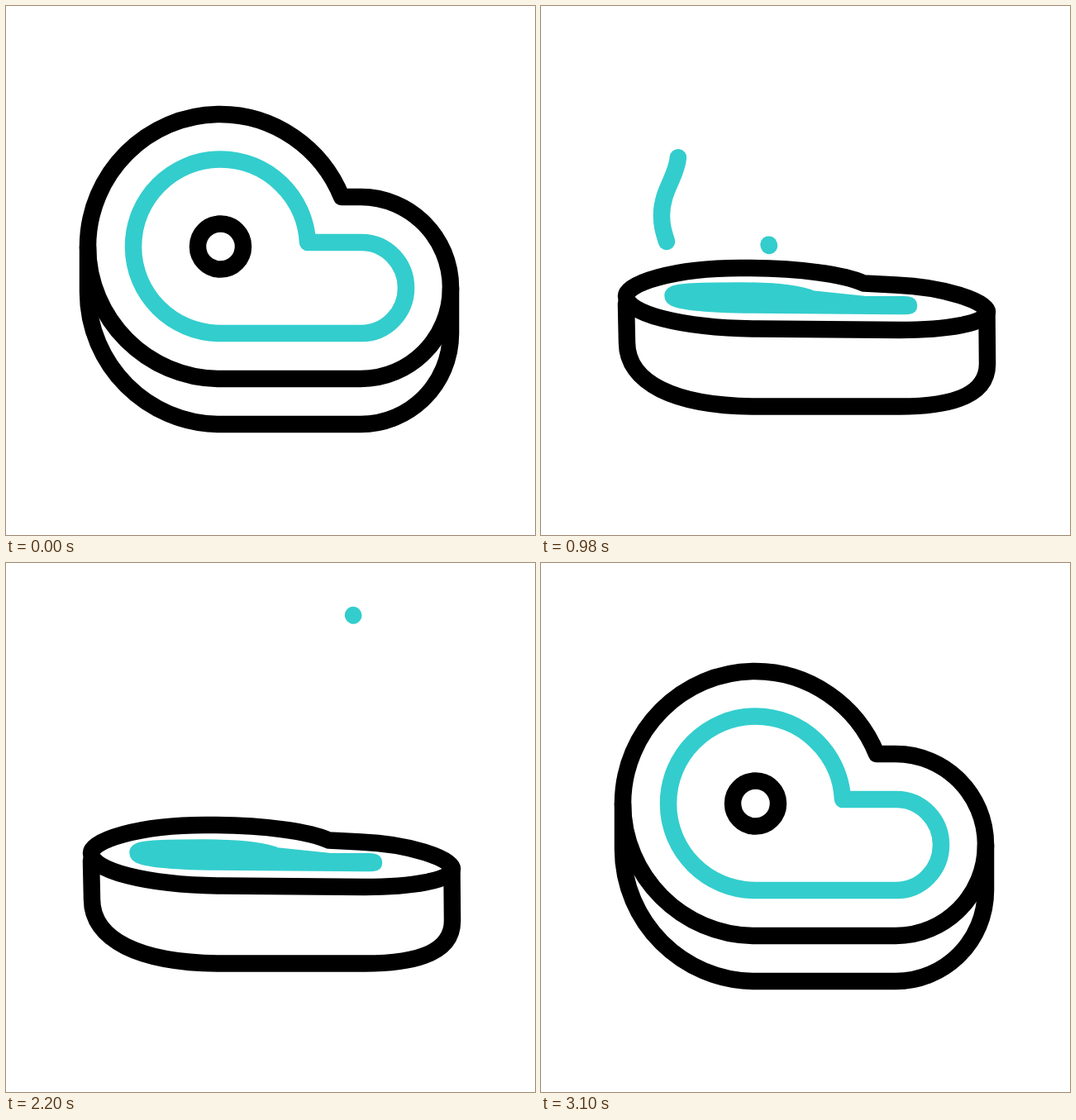
An HTML page that plays this animation: 640 px wide and 640 px high, repeating every 3580 ms.

```html
<!DOCTYPE html>
<html lang="en">
<head>
<meta charset="utf-8">
<title>Steak</title>
<style>
  html, body { margin: 0; width: 100%; height: 100%; overflow: hidden; background: #fff; }
  svg { display: block; width: 100%; height: 100%; }
  path { fill: none; stroke: #000; stroke-width: 20.5; stroke-linecap: round; stroke-linejoin: round; }
  .teal { stroke: #33cdcd; }
</style>
</head>
<body>
<svg viewBox="0 0 640 640">
  <path id="side"/>
  <path id="top"/>
  <path id="bone"/>
  <path id="fat" class="teal"/>
</svg>
<script>
const LOOP = 3580;
const svg = document.querySelector('svg');

// Each shape: standing pose, then lying pose with the same commands
const shapes = {
  side: [
    'M99 291 L99 346 C99 434 171 506 259 506 L429 506 C489 506 538 457 538 396 L538 341',
    'M103 360 L104 407 C104 455 160 484.5 262 484.5 L434 484.5 C505 484.5 540 468 540 433 L539.5 375'],
  top: [
    'M99 291 C99 203 171 131 259 131 C325 131 382 172 406 231 L429 231 C489 231 538 280 538 341 C538 402 489 451 429 451 L259 451 C171 451 99 379 99 291 Z',
    'M103 351 C103 336 160 317 241 317 C315 317 368 325 390.5 335.5 L429 337.5 C490 340 540 358 540 370 C540 384 490 392 434 392 L262 390.5 C170 390 103 372 103 351 Z'],
  bone: [
    'M232 291 A27.5 27.5 0 1 1 287 291 A27.5 27.5 0 1 1 232 291 Z',
    'M234 354 A27 0.4 0 1 1 288 354 A27 0.4 0 1 1 234 354 Z'],
  fat: [
    'M154 291 C154 233 201 185.5 259.5 185.5 C316 185.5 362 230 365 286 L430 286 C460 286 484 311 484 341 C484 371 460 396 430 396 L259.5 396 C201 396 154 349 154 291 Z',
    'M159.5 350.5 C159.5 346 185 344.5 240 344.5 C285 344.5 313 348 327.5 354.5 L390 361 C415 362 445 360 445 362.5 C445 363 438 363 430 363 L245 361.5 C185 360 159.5 356 159.5 350.5 Z']
};

const wisp = 'M152 285 C148 272 146 266 146 253 C146 222 166 205 166 180 C166 160 154 150 154 134 C154 120 167 94 167 68 C167 58 165 49 161 41';
const wisps = [[0, 0], [124, 5], [259, 22]].map(([x, y]) => {
  const p = document.createElementNS(svg.namespaceURI, 'path');
  p.setAttribute('class', 'teal');
  p.setAttribute('d', wisp);
  p.setAttribute('pathLength', 1);
  p.setAttribute('transform', `translate(${x} ${y})`);
  return svg.appendChild(p);
});

const progress = (t, from, to) => Math.min(1, Math.max(0, (t - from) / (to - from)));
const easeInOut = u => (1 - Math.cos(Math.PI * u)) / 2;
const easeOut = u => 1 - (1 - u) ** 2;

function morph([a, b], k) {
  const ends = b.match(/[\d.]+/g);
  let i = 0;
  // The unary plus keeps arc flags as a bare 0 or 1
  return a.replace(/[\d.]+/g, n => +(+n + (ends[i++] - n) * k).toFixed(2));
}

function draw(t) {
  const tilt = easeOut(progress(t, 290, 985)) - easeInOut(progress(t, 2215, 3095));
  for (const id in shapes)
    document.getElementById(id).setAttribute('d', morph(shapes[id], tilt));

  wisps.forEach((p, i) => {
    const local = t - 250 * i;
    const head = easeInOut(progress(local, 703, 1323));
    const tail = easeInOut(progress(local, 1120, 1720));
    p.style.display = head > 0 && tail < 1 ? '' : 'none';
    p.style.strokeDasharray = `${Math.max(0.001, head - tail)} 3`;
    p.style.strokeDashoffset = -tail;
  });
}

const start = performance.now();
function frame() {
  draw((performance.now() - start) % LOOP);
  requestAnimationFrame(frame);
}
frame();
</script>
</body>
</html>
```
